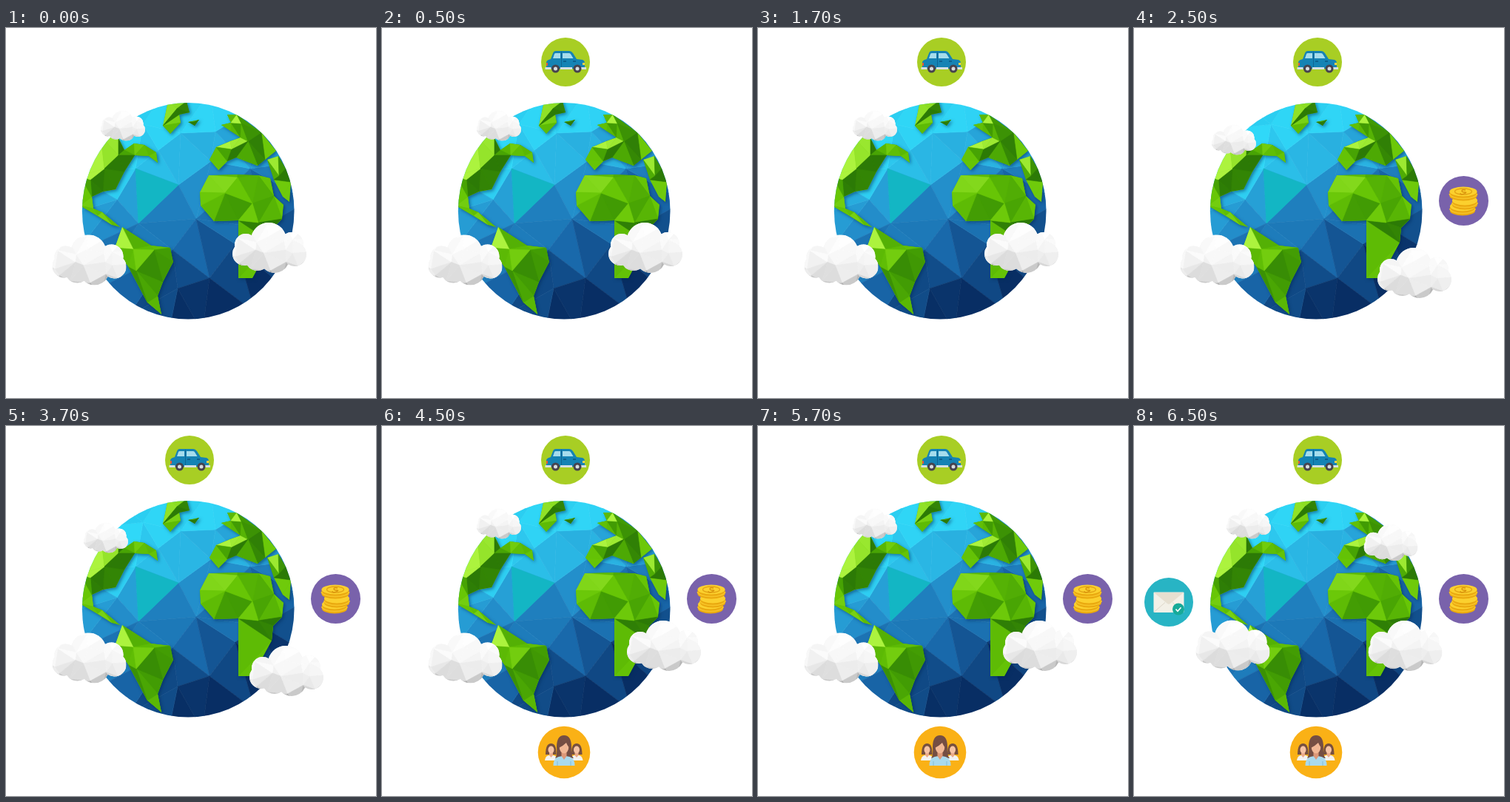
An HTML page for the animation above (8000 ms loop, 500 by 500 pixels).

```html
<!DOCTYPE html>
<html lang="en">
<head>
<meta charset="utf-8">
<title>Globe</title>
<style>
html, body { margin: 0; width: 100%; height: 100%; overflow: hidden; background: #fff; }
svg { display: block; width: 100vw; height: 100vh; }
.land { filter: drop-shadow(2px 2px 2px rgba(0, 40, 85, .5)); }
</style>
</head>
<body>
<svg viewBox="0 0 500 500">
  <defs id="defs">
    <clipPath id="disc"><ellipse cx="246.2" cy="247.3" rx="143.3" ry="146.3"/></clipPath>
    <clipPath id="puff">
      <circle cx="18" cy="31" r="15"/><circle cx="49" cy="25" r="24"/><circle cx="80" cy="30" r="16"/>
      <circle cx="16" cy="43" r="16"/><circle cx="34" cy="49" r="17"/><circle cx="57" cy="49" r="20"/>
      <circle cx="84" cy="44" r="16"/>
    </clipPath>
    <g id="cloud" clip-path="url(#puff)"><path d="M0 0h100v70H0z" fill="#f6f6f6"/></g>
  </defs>
  <g id="globe" clip-path="url(#disc)"></g>

  <g id="car">
    <circle cx="248" cy="46" r="33" fill="#a8ce24"/>
    <path d="M222 55V46q1-3 6-4l3-8q1-3 4-3h18q3 0 5 3l5 8 8 1q3 1 3 5v7z" fill="#1583b4"/>
    <path d="M231 41l2-6q.5-1 2-1h6v7zM244 34h9q1.500 0 2.500 2l3 5H244z" fill="#a5dcec"/>
    <path d="M242.500 32V56" stroke="#0e6594"/>
    <path d="M245 45h4M258 45h4" stroke="#0b5680" stroke-width="1.500"/>
    <path d="M220.500 54.500h8M241 54.500h16M269 54.500h7" stroke="#d7e0e4" stroke-width="3"/>
    <path d="M271 47h3v3h-3z" fill="#f6d14a"/><path d="M222 47h2v4h-2z" fill="#e4573d"/>
    <g fill="#d8dde1" stroke="#47434e" stroke-width="3">
      <circle cx="234.500" cy="55" r="4"/><circle cx="264" cy="55" r="4"/>
    </g>
  </g>

  <g id="coins">
    <circle cx="445.500" cy="233.500" r="33.500" fill="#7962ab"/>
    <g id="stack"></g>
    <ellipse cx="445" cy="221" rx="11.500" ry="4" fill="none" stroke="#e2a315" stroke-width="1.300"/>
    <path d="M448 219q-5-1-5 1t4 2-1 2-5-1" fill="none" stroke="#d8920c" stroke-width="1.300"/>
  </g>

  <g id="people">
    <circle cx="246" cy="441" r="35.300" fill="#fab116"/>
    <g id="side">
      <path d="M221 444q0-15 7.500-15t7 15z" fill="#77503f"/>
      <path d="M220 452q1-7 6-7h5q5 0 6 7z" fill="#f4f3f1"/>
      <path d="M226 441h5v4l-2.500 3-2.500-3z" fill="#e9a98a"/>
      <ellipse cx="228.500" cy="437.500" rx="4" ry="5" fill="#f5c3a5"/>
    </g>
    <use href="#side" transform="matrix(-1 0 0 1 491.500 0)"/>
    <path d="M234 449q3-4 2-15 0-16 10-16t10 16q-1 11 3 15z" fill="#754e43"/>
    <path d="M231.500 459q0-10 7-12l5-1h5l5 1q7 2 7 12z" fill="#a9daee"/>
    <path d="M242.500 440h7v6l-3.500 5-3.500-5z" fill="#dd9878"/>
    <ellipse cx="246" cy="434" rx="6.300" ry="8.500" fill="#f1b795"/>
    <path d="M239 435q0-10 7-10t7 10q-3-4-4-7-4 4-10 7" fill="#754e43"/>
    <path d="M237 453v6M255 453v6" stroke="#82bcd6"/>
  </g>

  <g id="mail">
    <circle cx="47" cy="238" r="33" fill="#28b4c4"/>
    <rect x="26.500" y="224.500" width="41" height="27.500" rx="1" fill="#f3f0e7"/>
    <path d="M27 251.500l15-13M67 251.500l-15-13" stroke="#ddd7c9"/>
    <path d="M27 225l18 15q2 1.500 4 0l18-15z" fill="#e6dfd0"/>
    <circle cx="60" cy="247.500" r="8" fill="#17aa98"/>
    <path d="M56.500 247.500l2.500 2.700 4.500-5" fill="none" stroke="#fff" stroke-width="1.600"/>
  </g>
  <g id="sky"></g>
</svg>
<script>
const $ = id => document.getElementById(id);

function add(parent, tag, attrs) {
  const el = document.createElementNS("http://www.w3.org/2000/svg", tag);
  for (const key in attrs) el.setAttribute(key, attrs[key]);
  return parent.appendChild(el);
}

let seed = 11;
const random = () => (seed = seed * 16807 % 2147483647) / 2147483647;
const jitter = size => (random() - .5) * size;

// Colour at t (0 to 1) along evenly spaced stops.
function ramp(stops, t) {
  const pos = Math.min(Math.max(t, 0), .9999) * (stops.length - 1);
  const i = Math.floor(pos);
  return `rgb(${stops[i].map((v, k) => Math.round(v + (stops[i + 1][k] - v) * (pos - i)))})`;
}

function circumcircle([ax, ay], [bx, by], [cx, cy]) {
  bx -= ax; by -= ay; cx -= ax; cy -= ay;
  const d = 2 * (bx * cy - by * cx), b = bx * bx + by * by, c = cx * cx + cy * cy;
  const x = (cy * b - by * c) / d, y = (bx * c - cx * b) / d;
  return { x: ax + x, y: ay + y, r: Math.hypot(x, y) };
}

// Delaunay triangles: those whose circumcircle holds no other point.
function triangulate(pts) {
  const found = [];
  for (const [i, a] of pts.entries())
    for (let j = i + 1; j < pts.length; j++)
      for (let k = j + 1; k < pts.length; k++) {
        const { x, y, r } = circumcircle(a, pts[j], pts[k]);
        if (pts.every(p => Math.hypot(p[0] - x, p[1] - y) > r - 1e-6)) found.push([a, pts[j], pts[k]]);
      }
  return found;
}

function polygon(parent, pts, fill) {
  add(parent, "polygon", {
    points: pts.map(p => p.slice(0, 2)).join(" "),
    fill, stroke: fill, "stroke-width": .6, "stroke-linejoin": "round"
  });
}

function facets(parent, pts, stops, shade) {
  for (const tri of triangulate(pts)) polygon(parent, tri, ramp(stops, shade(tri)));
}

const mean = (tri, axis) => (tri[0][axis] + tri[1][axis] + tri[2][axis]) / 3;
const parse = (text, z) => text.split(" ").map(p => [...p.split(",").map(Number), z]);

const BLUE = [[36, 190, 230], [48, 216, 248], [36, 146, 206], [24, 100, 166], [8, 46, 100]];
const GREEN = [[44, 122, 6], [70, 162, 4], [104, 198, 6], [172, 243, 62]];
const GREY = [[255, 255, 255], [247, 247, 247], [234, 234, 234], [208, 208, 208], [168, 168, 168]];
const globe = $("globe");

function ocean() {
  const pts = parse("206,165 277,180 175,190 233,212 179,264 257,258 225,300 275,338 310,292 " +
    "236,142 232,352 330,190 345,270 185,130 150,232 283,140", 0);
  for (let i = 0; i < 18; i++) {
    const angle = i / 18 * 2 * Math.PI + jitter(.15);
    pts.push([246 + 162 * Math.cos(angle), 247 + 165 * Math.sin(angle), 0]);
  }
  facets(globe, pts, BLUE, tri =>
    ((mean(tri, 0) - 100) * .45 + mean(tri, 1) - 100) / 360 + jitter(.12));
  polygon(globe, parse("175,190 233,212 179,264", 0), "#13b6c4");
}

// Brightness of a raised facet lit from the upper left.
function lit([a, b, c]) {
  const [ux, uy, uz] = b.map((v, i) => v - a[i]);
  const [vx, vy, vz] = c.map((v, i) => v - a[i]);
  const nx = uy * vz - uz * vy, ny = uz * vx - ux * vz, nz = ux * vy - uy * vx;
  const dot = (-.45 * nx - .5 * ny + .74 * nz) * Math.sign(nz) / Math.hypot(nx, ny, nz);
  return (dot - .3) / .7 + jitter(.25);
}

// A coast at sea level and the peaks inside it.
function land(coast, peaks) {
  const id = "land" + globe.childElementCount;
  add(add($("defs"), "clipPath", { id }), "polygon", { points: coast });
  const shape = add(add(globe, "g", { class: "land" }), "g", { "clip-path": `url(#${id})` });
  add(shape, "polygon", { points: coast, fill: "#5cb305" });
  facets(shape, [...parse(coast, 0), ...parse(peaks, 14)], GREEN, lit);
}

function cloud() {
  const pts = [];
  for (let x = -12; x <= 112; x += 20)
    for (let y = -12; y <= 84; y += 18) pts.push([x + jitter(13), y + jitter(12), 0]);
  facets($("cloud"), pts, GREY, tri => (Math.max(mean(tri, 1), 0) / 70) ** 1.5 * .75 + jitter(.3) + .05);
}

function coinStack() {
  [[444, 241, 17], [447, 233, 17], [445, 221, 18.5]].forEach(([x, y, r]) => {
    const rim = `a${r} 6.500 0 0 0 ${2 * r} 0`;
    add($("stack"), "path", { d: `M${x - r} ${y}v6${rim}v-6z`, fill: "#e9a80f" });
    add($("stack"), "ellipse", { cx: x, cy: y, rx: r, ry: 6.5, fill: "#fbd02e" });
    add($("stack"), "path", { d: `M${x - r} ${y + 3}${rim}`, fill: "none", stroke: "#f6c125", "stroke-width": 2 });
  });
}

ocean();
// The Americas
land("128,146 152,149 160,165 173,156 187,158 203,168 205,182 193,173 174,172 160,194 148,218 " +
  "131,221 116,228 118,244 130,249 154,269 143,266 124,254 100,240 100,200", "133,190 152,172 114,205");
land("157,269 196,294 222,297 226,316 212,343 205,362 210,387 191,371 165,322 147,297",
  "172,299 200,300 176,328");
// Africa
land("274,199 313,198 341,199 357,203 362,227 375,239 373,258 361,270 359,290 333,338 314,338 " +
  "314,260 281,261 263,240 262,222", "296,223 313,202 333,237 341,263");
// Europe and western Asia
land("275,178 284,161 303,153 317,148 291,131 304,128 299,117 312,117 345,141 365,166 350,178 " +
  "340,186 311,175 299,180 287,192", "327,153 305,164 318,129");
land("353,178 368,173 378,190 385,208 383,235 374,228 362,205", "369,200");
// Greenland and Iceland
land("219,99 244,99 248,114 234,117 236,128 222,143 212,132", "231,109");
land("246,127 261,124 255,132", "254,127");
cloud();
coinStack();

const LOOP = 8000;
const CUTS = [500, 2500, 4500, 6500];
const ICONS = ["car", "coins", "people", "mail"];
// Each cloud has a home and, in some scenes, another place.
const CLOUDS = [
  { size: .6, home: [128, 111], moved: { 2: [105, 130], 4: [125, 111] } },
  { size: 1, home: [62.5, 278.5], moved: { 4: [83.5, 261.5] } },
  { size: 1, home: [306, 262], moved: { 2: [329, 296], 3: [331, 262], 4: [316.5, 262] } },
  { size: .73, home: [310.5, 132], from: 4, moved: {} }
];
for (const item of CLOUDS) item.el = add($("sky"), "use", { href: "#cloud" });

function show(el, on) { el.setAttribute("visibility", on ? "visible" : "hidden"); }

function draw(ms) {
  const t = ms % LOOP;
  const scene = CUTS.filter(cut => t >= cut).length;
  ICONS.forEach((id, i) => show($(id), scene > i));
  for (const { el, size, home, moved, from = 0 } of CLOUDS) {
    show(el, scene >= from);
    el.setAttribute("transform", `translate(${moved[scene] ?? home}) scale(${size})`);
  }
}

let start;
function tick(now) {
  start ??= now;
  draw(now - start);
  requestAnimationFrame(tick);
}
draw(0);
requestAnimationFrame(tick);
</script>
</body>
</html>
```
